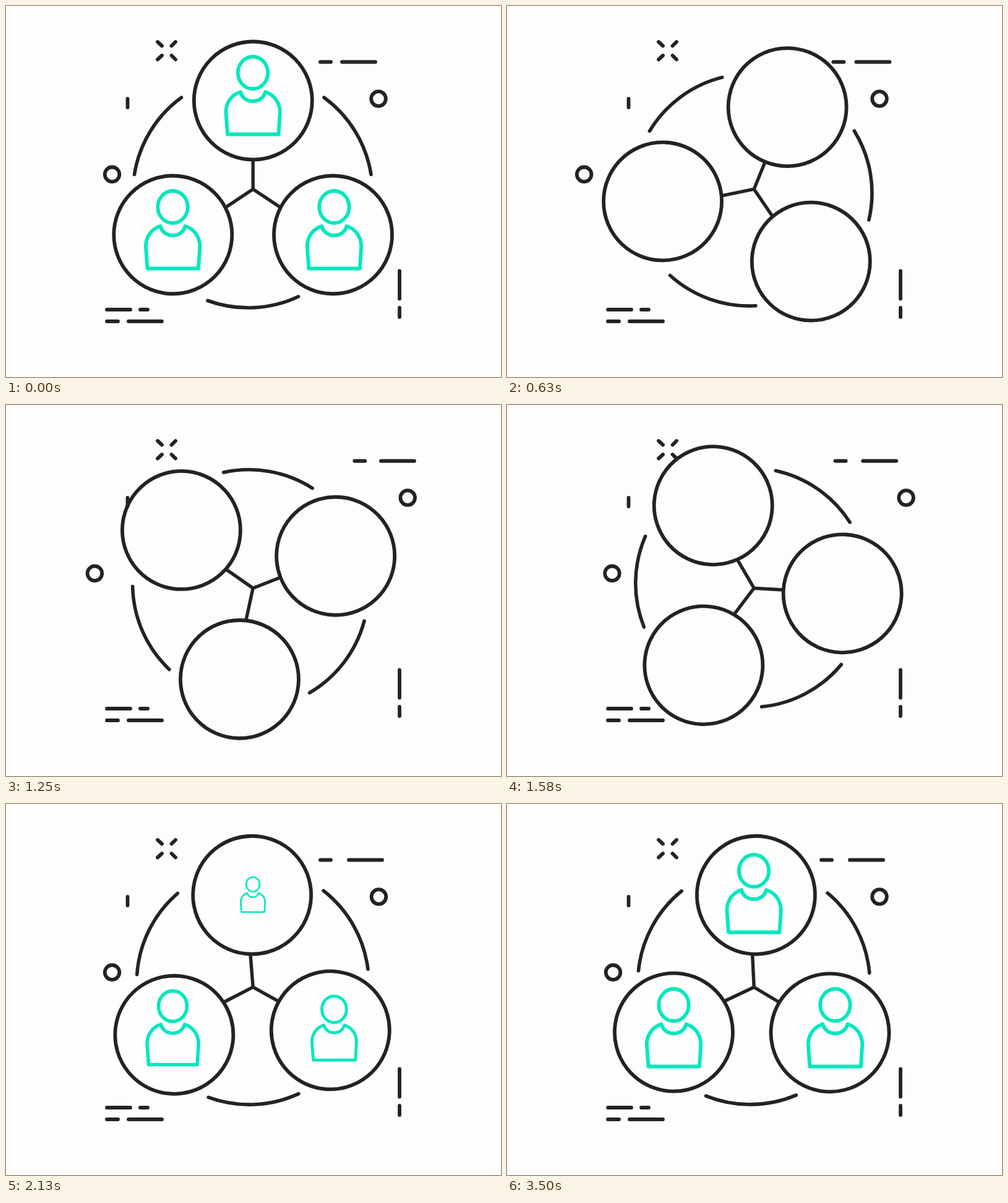
An HTML page that plays this animation: 800x600 px, repeating every 4000 ms.

```html
<!DOCTYPE html>
<html lang="en">
<head>
<meta charset="utf-8">
<title>People network</title>
<style>
  html, body { margin: 0; height: 100%; overflow: hidden; background: #fdfdfd; }
  svg { display: block; width: 100vw; height: 100vh; }
</style>
</head>
<body>
<svg viewBox="0 0 800 600" fill="none" stroke="#232227" stroke-width="5.8" stroke-linecap="round" stroke-linejoin="round">
  <defs>
    <g id="person">
      <ellipse cy="-40" rx="24.2" ry="26"/>
      <path d="M-20-9C-34-5-43.6 8-43.6 24L-41 59.5H41.5L43.8 24C43.8 8 34-5 20-9C18 0 10 6 0 6S-18 0-20-9Z"/>
    </g>
  </defs>

  <path d="M245 58l7 6.5M274 58l-6.5 6.5M245 86.5l7-6.5M274 86.5l-6.5-6.5
           M196.5 150v14M636 428.5v45M636 488v15
           M163 491h38M217 491h12M163 510h18M198 510h54"/>
  <path id="dashShort" d="M508 90.5h17"/>
  <path id="dashLong" d="M543 90.5h54"/>
  <circle id="dotLeft" cx="171.5" cy="272.3" r="11.8"/>
  <circle id="dotRight" cx="602" cy="150" r="11.8"/>

  <g id="wheel">
    <circle cx="399.3" cy="153" r="95.5"/>
    <circle cx="269.8" cy="370" r="95.5"/>
    <circle cx="528.5" cy="370" r="95.5"/>
    <path stroke-width="5.4" d="M399.2 249V296.2L356 325M399.2 296.2L442.5 325"/>
    <path stroke-width="5.6" d="M207.5 272.5A191 191 0 0 1 283.5 148M514 148A191 191 0 0 1 590 272.5M326 476.5A191 191 0 0 0 472.5 470"/>
  </g>

  <g stroke="#00e8be">
    <use class="person" href="#person"/>
    <use class="person" href="#person"/>
    <use class="person" href="#person"/>
  </g>
</svg>
<script>
  const LOOP = 4000, FPS = 24;
  const PIVOT = '399.2 296.2', TURN = 120.93;
  const people = [
    { x: 399, y: 148, start: 44 },
    { x: 269.5, y: 365, start: 38 },
    { x: 530.4, y: 365, start: 40 },
  ];
  const figures = document.querySelectorAll('.person');

  // Smooth progress from 0 to 1 between two ticks
  function ease(tick, from, to) {
    const s = Math.min(1, Math.max(0, (tick - from) / (to - from)));
    return s * s * (3 - 2 * s);
  }

  // Goes out to peak, then settles at rest
  function swing(tick, [start, turn, end], peak, rest = 0) {
    return peak * ease(tick, start, turn) + (rest - peak) * ease(tick, turn, end);
  }

  function place(id, transform) {
    document.getElementById(id).setAttribute('transform', transform);
  }

  function draw(now) {
    // The motion runs at 24 steps a second and rests after 3500 ms
    const tick = Math.min(84, Math.floor((now % LOOP + 5) * FPS / 1000));

    place('wheel', `rotate(${TURN * ease(tick, 0, 55)} ${PIVOT})`);
    place('dashShort', `translate(${swing(tick, [10, 24, 47], 66.5)} 0)`);
    place('dashLong', `translate(${swing(tick, [10, 24, 47], 73.5, 11)} 0)`);
    place('dotLeft', `translate(${swing(tick, [6, 19, 40], -60.5)} 0)`);
    place('dotRight', `translate(${swing(tick, [17, 33, 52], 52)} 0)`);

    people.forEach(({ x, y, start }, i) => {
      const scale = 1 - ease(tick, 0, 10) + ease(tick, start, start + 15);
      figures[i].setAttribute('transform', `translate(${x} ${y}) scale(${scale})`);
    });
    requestAnimationFrame(frame);
  }

  const begin = performance.now();
  function frame() {
    draw(performance.now() - begin);
  }
  frame();
</script>
</body>
</html>
```
